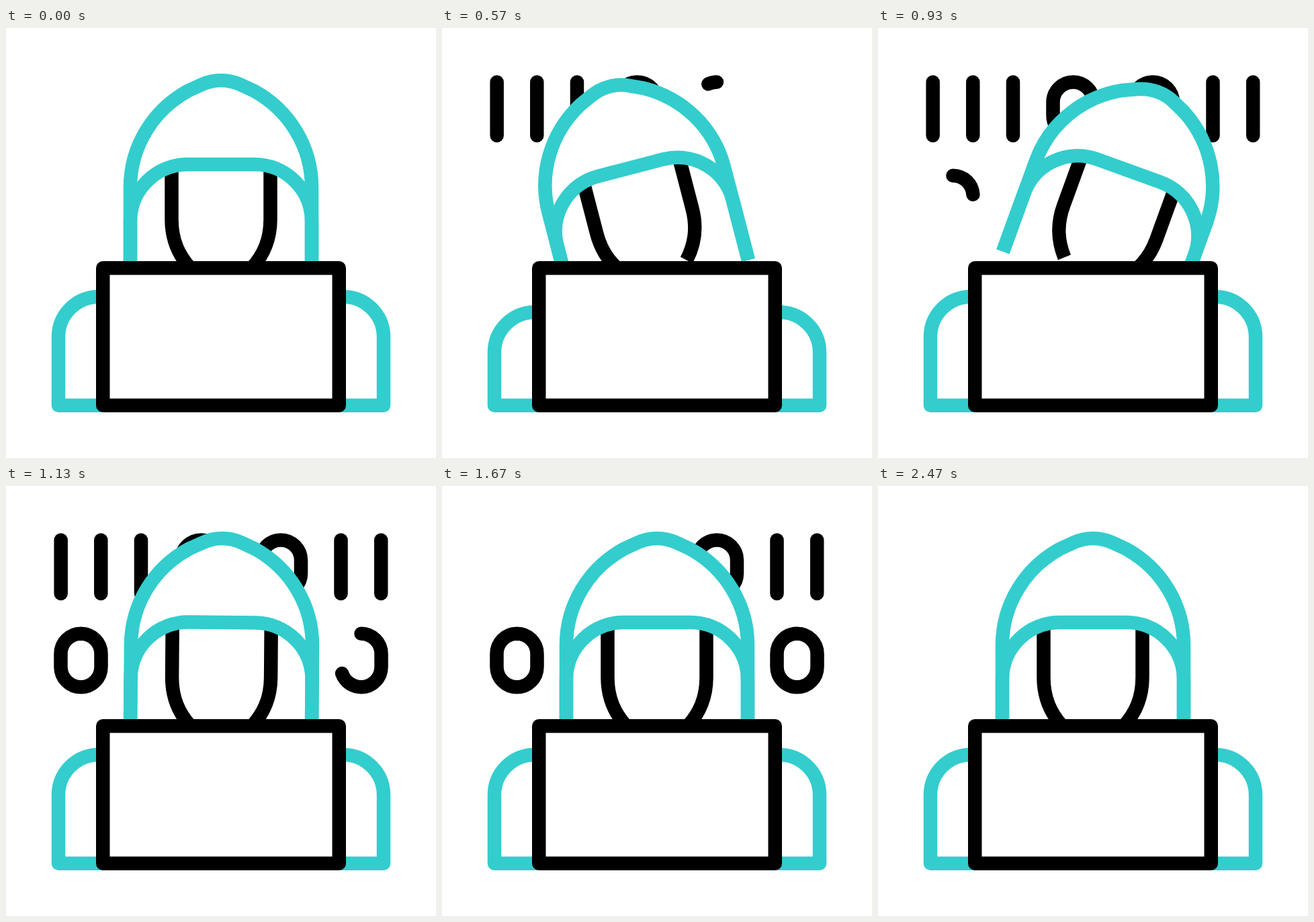
These frames come from a looping animation (640 px wide and 640 px high, 2.5 s). An HTML page:

```html
<!DOCTYPE html>
<html lang="en">
<head>
<meta charset="utf-8">
<title>Hooded figure at a laptop</title>
<style>
  html, body { margin: 0; width: 100%; height: 100%; overflow: hidden; background: #fff; }
  svg { display: block; width: 100%; height: 100%; }
  path, rect { fill: none; stroke: #000; stroke-width: 20.5; stroke-linejoin: round; }
  .teal { stroke: #33cdcd; }
  .solid { fill: #fff; }
  #digits path { stroke-linecap: round; }
</style>
</head>
<body>
<svg viewBox="0 0 640 640">
  <g id="digits"></g>
  <g id="head">
    <path class="teal solid" d="M185 380V237C185 176 219 122 271 93.5L290 84.8A70 70 0 0 1 350 84.8L369 93.5C421 122 455 176 455 237V380"/>
    <path d="M246.5 206V285C246.5 316 257 338 274 357M393.5 206V285C393.5 316 383 338 366 357"/>
    <path class="teal" d="M185 380V288A85 85 0 0 1 270 203H370A85 85 0 0 1 455 288V380"/>
  </g>
  <path id="body" class="teal"/>
  <rect class="solid" x="144.25" y="357.25" width="351.5" height="204.5"/>
</svg>
<script>
const LOOP = 2500, TICKS = 75;
const $ = id => document.getElementById(id);

const ease = (t, from, to) => {
  const u = Math.min(1, Math.max(0, (t - from) / (to - from)));
  return u * u * (3 - 2 * u);
};

// keys: [tick, value] pairs, eased between neighbours
const track = (t, keys) => keys.slice(1).reduce(
  (v, [at, value], i) => v + (value - keys[i][1]) * ease(t, keys[i][0], at), keys[0][1]);

const HEAD = [[6, 0], [13.8, -20], [28.2, 20], [34.5, 0]];
const BODY = [[0, 0], [14, 27.7], [26, 0]];

const bar = x => `M${x} 160V80.5`;
const ring = (x, y, dir) => {
  const r = 30 * dir, sweep = dir > 0 ? 1 : 0;
  const arc = (dx, dy) => `a30 30 0 0 ${sweep} ${dx} ${dy}`;
  return `M${x} ${y}${arc(r, 30)}v19.5${arc(-2 * r, 0)}v-19.5${arc(r, -30)}`;
};

// shape, draw start, erase start, draw time, erase time
const digits = [
  [bar(81.7), 2.5, 34.5],
  [bar(141.3), 6.2, 38.3],
  [bar(201), 9, 42],
  [ring(290.5, 80.5, -1), 11.5, 46.1],
  [ring(409, 80.5, -1), 16.4, 50.5],
  [bar(498.5), 19.5, 54],
  [bar(558.2), 23, 57.5],
  [ring(111.5, 219.7, 1), 26.5, 61],
  [ring(528.5, 219.7, 1), 29.9, 66, 6.6, 8]
].map(([d, draw, erase, drawTime = 5, eraseTime = 4]) => {
  const el = document.createElementNS($('digits').namespaceURI, 'path');
  el.setAttribute('d', d);
  el.setAttribute('pathLength', 1);
  $('digits').append(el);
  return { el, draw, erase, drawTime, eraseTime };
});

const shoulder = (x, dir, y) =>
  `M${x + 67 * dir} ${y}H${x + 60 * dir}A60 60 0 0 ${dir > 0 ? 0 : 1} ${x} ${y + 60}V561.75H${x + 67 * dir}`;

function render(t) {
  $('head').setAttribute('transform', `rotate(${track(t, HEAD)} 320 359)`);
  const y = 400 + track(t, BODY);
  $('body').setAttribute('d', shoulder(78, 1, y) + shoulder(562, -1, y));

  for (const { el, draw, erase, drawTime, eraseTime } of digits) {
    const end = ease(t, draw, draw + drawTime);
    const start = ease(t, erase, erase + eraseTime);
    el.style.display = end > start ? '' : 'none';
    el.style.strokeDasharray = `${end - start} 2`;
    el.style.strokeDashoffset = -start;
  }
}

const origin = performance.now();
function loop() {
  render((performance.now() - origin) % LOOP / LOOP * TICKS);
  requestAnimationFrame(loop);
}
loop();
</script>
</body>
</html>
```
